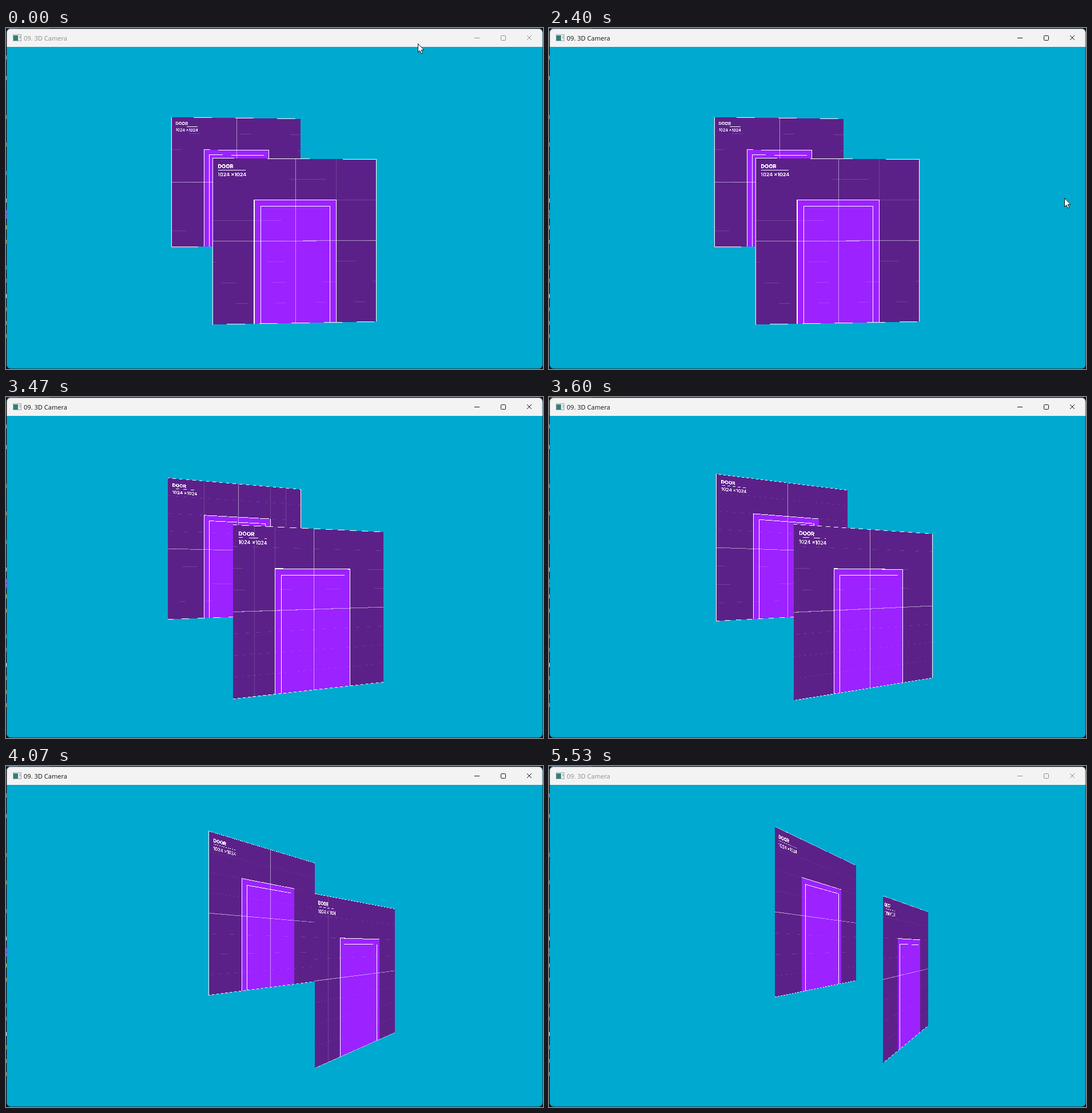
Recreate the animation shown at these times as an HTML page with a canvas. Size 939 by 596 pixels, loop 6200 ms.

```html
<!DOCTYPE html>
<html lang="en">
<head>
<meta charset="utf-8">
<title>3D Camera</title>
<style>
html, body { margin: 0; width: 100%; height: 100%; overflow: hidden; background: #0b0b12; }
canvas { display: block; }
</style>
</head>
<body>
<canvas id="stage" width="939" height="596"></canvas>
<script>
const LOOP = 6200, STEP = 1000 / 15, SIZE = 1024;
const CX = 470.3, CY = 314.6, FOCAL = 498.2;
const VIEW = { x: 250, y: 90, w: 460, h: 460 };
const ctx = document.getElementById('stage').getContext('2d', { willReadFrequently: true });
const texels = makeTexture();

function makeTexture() {
  const c = document.createElement('canvas');
  c.width = c.height = SIZE;
  const g = c.getContext('2d');
  const rect = (color, x, y, w, h) => { g.fillStyle = color; g.fillRect(x, y, w, h); };

  rect('#5c2188', 0, 0, SIZE, SIZE);
  rect('#9c22ff', 256, 256, 512, 768);
  for (let p = 128; p < SIZE; p += 128) {
    rect('rgba(255,255,255,.15)', p, 0, 1, SIZE);
    rect('rgba(255,255,255,.15)', 0, p, SIZE, 1);
  }
  rect('rgba(255,255,255,.5)', 510, 0, 4, SIZE);
  rect('rgba(255,255,255,.5)', 0, 510, SIZE, 4);

  g.strokeStyle = '#fff';
  g.lineWidth = 4;
  g.strokeRect(0, 0, SIZE, SIZE);
  g.strokeRect(256, 256, 512, 800);
  g.strokeRect(296, 296, 432, 800);

  rect('#fff', 34, 73, 170, 2);
  g.font = '800 33px Inter, sans-serif';
  g.fillText('DOOR', 32, 62);
  g.font = '600 31px Inter, sans-serif';
  g.fillText('1024 ×1024', 32, 112);
  return new Uint32Array(g.getImageData(0, 0, SIZE, SIZE).data.buffer);
}

// The camera turns at a constant rate while strafing left.
function cameraAt(t) {
  const rad = Math.PI / 180, rate = 45 * rad, arc = 2.05 / rate;
  const yawAt = ms => 3.2 * rad + rate * (ms - 3200) / 1000;
  const from = yawAt(3221), to = yawAt(Math.max(3221, Math.min(t, 4313)));
  return {
    yaw: t < 3200 ? 2.5 * rad : yawAt(Math.min(t, 4332)),
    x: -arc * (Math.sin(to) - Math.sin(from)),
    z: -1.975 + arc * (Math.cos(from) - Math.cos(to))
  };
}

// Nearest-texel sampling of a unit square whose top left corner is (left, top, depth).
function drawPanel(out, cam, left, top, depth) {
  const c = Math.cos(cam.yaw), s = Math.sin(cam.yaw);
  const dx = left - cam.x, dz = depth - cam.z;
  const vx = dx * c - dz * s, vz = dx * s + dz * c;
  for (let i = 0; i < VIEW.w; i++) {
    const ray = (VIEW.x + i + .5 - CX) / FOCAL;
    const u = (ray * vz - vx) / (c - ray * s);
    if (u < 0 || u >= 1) continue;
    const z = vz + u * s, col = Math.floor(u * SIZE);
    for (let j = 0; j < VIEW.h; j++) {
      const v = top - (CY - VIEW.y - j - .5) * z / FOCAL;
      if (v >= 0 && v < 1) out[j * VIEW.w + i] = texels[Math.floor(v * SIZE) * SIZE + col];
    }
  }
}

function drawScene(t) {
  const img = ctx.getImageData(VIEW.x, VIEW.y, VIEW.w, VIEW.h);
  const out = new Uint32Array(img.data.buffer), cam = cameraAt(t);
  drawPanel(out, cam, -.7, .7, .25);
  drawPanel(out, cam, -.3, .3, -.25);
  ctx.putImageData(img, VIEW.x, VIEW.y);
}

function fill(color, x, y, w, h) {
  ctx.fillStyle = color;
  ctx.fillRect(x, y, w, h);
}

function drawWindow(active) {
  fill('#0b0b12', 0, 0, 939, 596);
  fill('#4a5a70', 0, 0, 20, 1);
  fill('#33343c', 20, 0, 56, 1);
  // slivers of whatever lies behind the window
  [[48, '#999'], [84, '#aaa'], [152, '#a67c52'], [200, '#b08050'], [250, '#4a8fb0'], [298, '#ccc'],
   [318, '#c050ff'], [326, '#c050ff'], [345, '#e0b040'], [370, '#d09040'], [415, '#4a8fb0'],
   [438, '#4a8fb0'], [465, '#eee'], [488, '#b08050'], [512, '#c09050'], [535, '#c09050']
  ].forEach(([y, color]) => fill(color, 0, y, 1, 7));

  ctx.save();
  ctx.beginPath();
  ctx.roundRect(1, 1, 937.5, 594.5, 7);
  ctx.clip();
  fill('#00a9d0', 0, 0, 939, 596);
  fill('#f3f3f3', 0, 0, 939, 33);
  ctx.strokeStyle = 'rgba(50,80,92,.5)';
  ctx.lineWidth = 2;
  ctx.stroke();
  ctx.restore();

  fill('#a4a8ac', 12, 11, 15, 12);
  fill('#e8eaea', 13, 12, 13, 10);
  fill('#2f7f78', 13, 13, 8, 9);
  fill('#8b9299', 24, 14, 1, 4);

  const ink = active ? '#111' : '#8c8c8c';
  ctx.fillStyle = ctx.strokeStyle = ink;
  ctx.font = '11.1px "Open Sans", "Noto Sans", sans-serif';
  ctx.fillText('09. 3D Camera', 31, 22);
  ctx.lineWidth = 1;
  ctx.beginPath();
  ctx.moveTo(819, 17.5);
  ctx.lineTo(828, 17.5);
  ctx.roundRect(865.5, 13.5, 8, 8, 1);
  ctx.moveTo(911, 13);
  ctx.lineTo(919, 21);
  ctx.moveTo(919, 13);
  ctx.lineTo(911, 21);
  ctx.stroke();
}

// [start, x, y]; no place means hidden
const pointer = [
  [0, 720, 27], [190, 775, 52], [260, 887, 102], [330], [1730, 937, 283],
  [2390, 901, 297], [2860], [4795, 628, 419], [4860, 912, 580], [4930]
];

function drawPointer(t) {
  const [, x, y] = pointer.filter(p => p[0] <= t + 4).pop();
  if (x === undefined) return;
  ctx.save();
  ctx.translate(x, y);
  ctx.beginPath();
  [[.5, .5], [.5, 15.5], [3.8, 12.4], [6, 17.8], [8.6, 16.8], [6.4, 11.5], [11, 11.3]]
    .forEach(p => ctx.lineTo(...p));
  ctx.closePath();
  ctx.fillStyle = '#fff';
  ctx.strokeStyle = '#111';
  ctx.lineWidth = 1;
  ctx.fill();
  ctx.stroke();
  ctx.restore();
}

let start, shown = -1;
function frame(now) {
  start ??= now;
  const step = Math.floor(((now - start) % LOOP + 4) / STEP);
  if (step !== shown) {
    shown = step;
    const t = step * STEP;
    drawWindow(t >= 1999 && t < 5530);
    drawScene(t);
    drawPointer(t);
  }
  requestAnimationFrame(frame);
}
requestAnimationFrame(frame);
</script>
</body>
</html>
```
